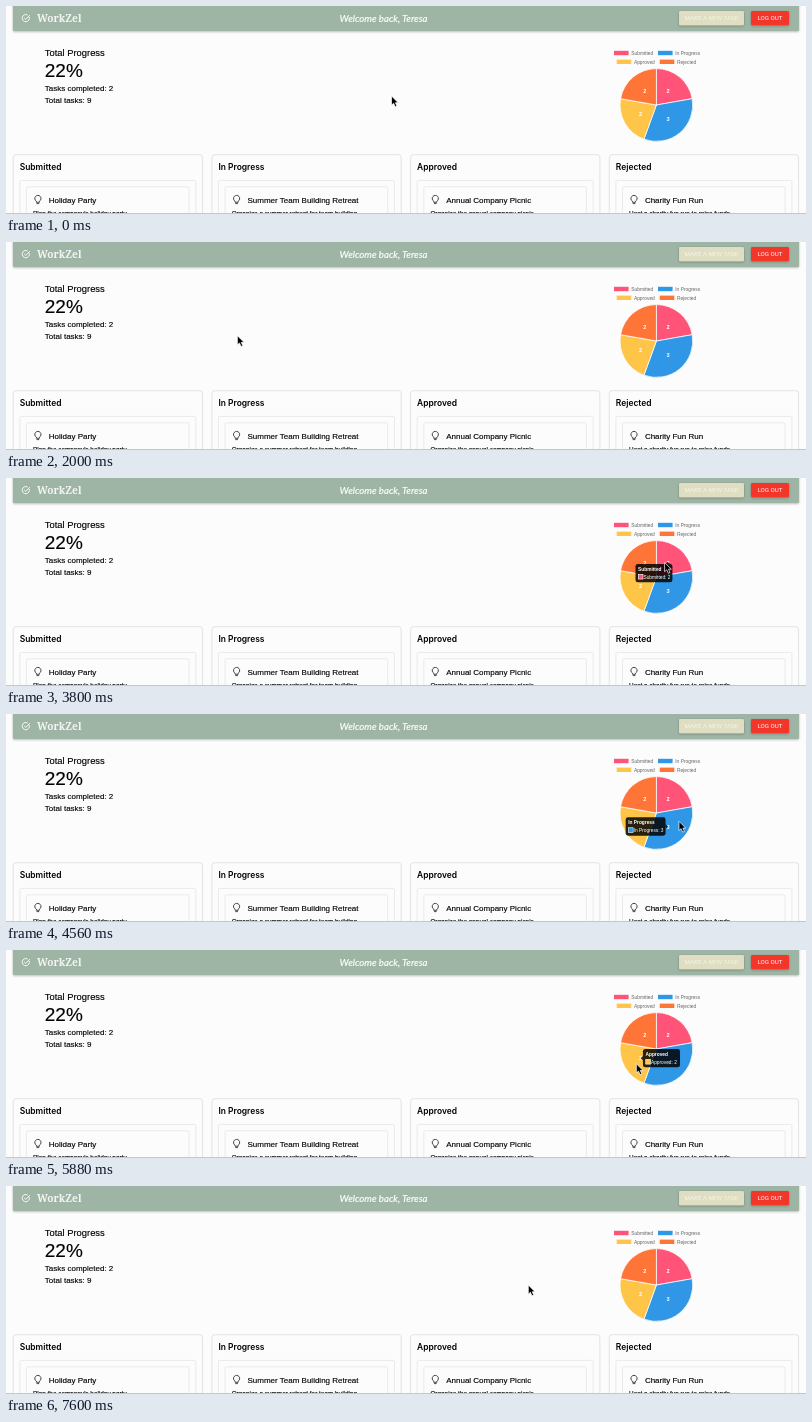
An HTML page that plays this animation: 800x208 px, repeating every 7.64 s.

```html
<!DOCTYPE html>
<html lang="en">
<head>
<meta charset="utf-8">
<title>Task dashboard</title>
<style>
  html, body { margin: 0; width: 100%; height: 100%; overflow: hidden; background: #fcfcfc; }
  svg { display: block; width: 800px; height: 208px; }
  text { font-family: "Liberation Sans", Arial, sans-serif; fill: #000; }
  .body { stroke: #000; stroke-width: 0.14; }
  .brand { font: bold 10.2px "Noto Serif", serif; fill: #f3f6f4; }
  .welcome { font: italic 9.7px Lato, sans-serif; fill: #fff; stroke: #fff; stroke-width: 0.2; }
  .button { font: 6.2px Roboto, sans-serif; }
  .heading { font: 600 8.45px Inter, sans-serif; }
  .legend { font-size: 4.9px; fill: #666; }
  .count { font-size: 5.6px; font-weight: bold; fill: #fff; }
  .tip { font-size: 4.8px; fill: #fff; }
</style>
</head>
<body>
<svg id="stage" viewBox="0 0 800 208">
  <defs>
    <filter id="shadow" x="-5%" y="-20%" width="110%" height="160%">
      <feDropShadow dx="0" dy="0.7" stdDeviation="0.8" flood-opacity="0.3"/>
    </filter>
  </defs>
  <rect width="800" height="208" fill="#fcfcfc"/>
  <rect x="7" y="-4" width="786" height="29" rx="1" fill="#9eb4a4" filter="url(#shadow)"/>
  <g fill="none" stroke="#fff" stroke-width="0.9">
    <path d="M23.2 10.9A3.6 3.6 0 1 1 21.6 9"/>
    <path d="M18.2 11.8l1.6 1.6 4-4.2"/>
  </g>
  <text class="brand" x="31" y="15.5">WorkZel</text>
  <text class="welcome" x="377.5" y="15.7" text-anchor="middle">Welcome back, Teresa</text>
  <g filter="url(#shadow)">
    <rect x="673" y="5" width="65" height="14.3" rx="1.4" fill="#dfdec2"/>
    <rect x="745" y="5" width="38" height="14.3" rx="1.4" fill="#f3352b"/>
  </g>
  <text class="button" x="705.5" y="14.2" text-anchor="middle" style="fill:#f5f4e8">MAKE A NEW TASK</text>
  <text class="button" x="764" y="14.2" text-anchor="middle" style="fill:#fff">LOG OUT</text>

  <g class="body">
    <text x="38.8" y="50.4" font-size="9.4">Total Progress</text>
    <text x="38.8" y="70.7" font-size="19">22%</text>
    <text x="38.8" y="84.6" font-size="8">Tasks completed: 2</text>
    <text x="38.8" y="97.2" font-size="8">Total tasks: 9</text>
  </g>

  <g id="chart"></g>
  <g id="columns"></g>
  <rect y="207" width="800" height="1" fill="#c6c6c6"/>

  <g id="tooltip">
    <rect id="tipBox" height="18.4" rx="2.4" fill="#000" fill-opacity="0.84"/>
    <path id="tipCaret" fill="#000" fill-opacity="0.84"/>
    <text id="tipTitle" class="tip" x="2.6" y="6.8" font-weight="bold"></text>
    <rect id="tipSwatch" x="2.8" y="10.5" width="4.7" height="4.7" stroke="#fff" stroke-width="0.6"/>
    <text id="tipText" class="tip" x="8" y="14.8"></text>
  </g>
  <path id="cursor" d="M0 0V9.2L2.1 7.3 3.7 10.8 5.4 10 3.9 6.7H6.7Z" fill="#000" stroke="#fff" stroke-width="0.7" stroke-linejoin="round"/>
</svg>
<script>
const LOOP = 7640, STEP = 40;
const PIE = { x: 650.4, y: 99, r: 36.4 };
const $ = id => document.getElementById(id);

// tip: tooltip box; caret: its pointer relative to the box
const slices = [
  { name: 'Submitted', value: 2, color: '#ff5378', key: [608, 47],
    tip: { x: 629, y: 86.3, w: 37 }, caret: 'M30 0L32.3 -2 34.5 0Z' },
  { name: 'In Progress', value: 3, color: '#3097e6', key: [652, 47],
    tip: { x: 619.4, y: 103.7, w: 40 }, caret: 'M40 7L42.2 9.2 40 11.4Z' },
  { name: 'Approved', value: 2, color: '#fec549', key: [610.7, 55.8],
    tip: { x: 637.4, y: 98.8, w: 37 }, caret: 'M0 7L-2.2 9.2 0 11.4Z' },
  { name: 'Rejected', value: 2, color: '#ff7437', key: [653.7, 55.8],
    tip: { x: 641.2, y: 76, w: 35.2 }, caret: 'M0 7L-2.2 9.2 0 11.4Z' }
];

const tasks = [
  ['Holiday Party', "Plan the company's holiday party."],
  ['Summer Team Building Retreat', 'Organize a summer retreat for team building.'],
  ['Annual Company Picnic', 'Organize the annual company picnic.'],
  ['Charity Fun Run', 'Host a charity fun run to raise funds.']
];

// time, x, y of the pointer tip
const path = [
  [0, 385.5, 90], [160, 382, 90], [900, 162, 79], [1160, 149.8, 80], [1700, 140, 82],
  [2700, 563, 136], [2880, 567, 137], [3000, 570, 135], [3700, 658, 85], [3800, 658.6, 84.5],
  [4100, 660, 86], [4650, 674, 109], [5200, 678.8, 111], [5350, 678, 112], [5800, 632, 116],
  [5950, 629, 112], [6270, 634, 82], [6520, 604.8, 86], [7150, 540, 97], [7600, 522.3, 99]
];

// time, hovered slice (-1 for none)
const hovers = [[3380, 2], [3480, 3], [3580, 0], [4320, 1], [5640, 2], [6110, 3], [6520, -1]];

const lerp = (a, b, u) => a + (b - a) * u;
const clamp = u => Math.max(0, Math.min(1, u));
const smooth = u => u * u * (3 - 2 * u);
const easeOut = u => 1 - (1 - u) ** 4;

function polar(turn, r) {
  const a = turn * 2 * Math.PI;
  return [PIE.x + r * Math.sin(a), PIE.y - r * Math.cos(a)];
}

function drawChart() {
  const total = slices.reduce((sum, s) => sum + s.value, 0);
  let turn = 0, wedges = '', labels = '';
  for (const s of slices) {
    const end = turn + s.value / total;
    const [x, y] = polar((turn + end) / 2, PIE.r / 2);
    const [kx, ky] = s.key;
    wedges += `<path d="M${PIE.x} ${PIE.y}L${polar(turn, PIE.r)}A${PIE.r} ${PIE.r} 0 0 1 ${polar(end, PIE.r)}Z" fill="${s.color}" stroke="#fff" stroke-width="0.75"/>`;
    labels += `<text class="count" x="${x}" y="${y + 2}" text-anchor="middle">${s.value}</text>
      <rect x="${kx}" y="${ky - 2.2}" width="14.6" height="4.4" fill="${s.color}"/>
      <text class="legend" x="${kx + 17.2}" y="${ky + 1.7}">${s.name}</text>`;
    turn = end;
  }
  $('chart').innerHTML = wedges + labels;
}

function drawColumns() {
  const frame = (x, y, w, rx, color) =>
    `<rect x="${x}" y="${y}" width="${w}" height="80" rx="${rx}" fill="#fcfcfc" stroke="${color}" stroke-width="0.8"/>`;
  $('columns').innerHTML = tasks.map(([title, detail], i) => `
    <g transform="translate(${7.2 + i * 198.7} 0)">
      ${frame(0, 148.7, 189.3, 3, '#dcdcdc')}
      ${frame(6.6, 174.4, 176, 1.5, '#e6e6e6')}
      ${frame(13.2, 180.8, 162.6, 1.5, '#e6e6e6')}
      <text class="heading" x="6.5" y="164.4">${slices[i].name}</text>
      <path d="M23.2 196.3V195.2A3.1 3.1 0 1 1 26.2 195.2V196.3ZM23.4 197.6H26" fill="none" stroke="#333" stroke-width="0.9"/>
      <g class="body">
        <text x="35.6" y="196.6" font-size="8">${title}</text>
        <text x="19.8" y="210.2" font-size="6.4">${detail}</text>
      </g>
    </g>`).join('');
}

function pointerAt(t) {
  const next = path.findIndex(p => p[0] > t);
  if (next < 0) return path.at(-1).slice(1);
  const [t0, x0, y0] = path[next - 1], [t1, x1, y1] = path[next];
  const u = smooth((t - t0) / (t1 - t0));
  return [lerp(x0, x1, u), lerp(y0, y1, u)];
}

function drawTooltip(t) {
  const now = hovers.findLastIndex(h => h[0] <= t);
  if (now < 0) return $('tooltip').setAttribute('opacity', 0);
  const [since, index] = hovers[now];
  const leaving = index < 0;
  const slice = slices[leaving ? hovers[now - 1][1] : index];
  const from = now && !leaving ? slices[hovers[now - 1][1]].tip : slice.tip;
  const u = easeOut(clamp((t - since) / 400));
  const box = k => lerp(from[k], slice.tip[k], u);
  const opacity = leaving ? 1 - clamp((t - since) / 200) : clamp((t - hovers[0][0]) / 200);

  $('tooltip').setAttribute('opacity', opacity);
  $('tooltip').setAttribute('transform', `translate(${box('x')} ${box('y')})`);
  $('tipBox').setAttribute('width', box('w'));
  $('tipCaret').setAttribute('d', slice.caret);
  $('tipSwatch').setAttribute('fill', slice.color);
  $('tipTitle').textContent = slice.name;
  $('tipText').textContent = `${slice.name}: ${slice.value}`;
}

function render(t) {
  drawTooltip(t);
  $('cursor').setAttribute('transform', `translate(${pointerAt(t)})`);
}

drawChart();
drawColumns();
const start = performance.now();
function tick() {
  const t = (performance.now() - start) % LOOP;
  render(Math.floor(t / STEP) * STEP);
  requestAnimationFrame(tick);
}
tick();
</script>
</body>
</html>
```
